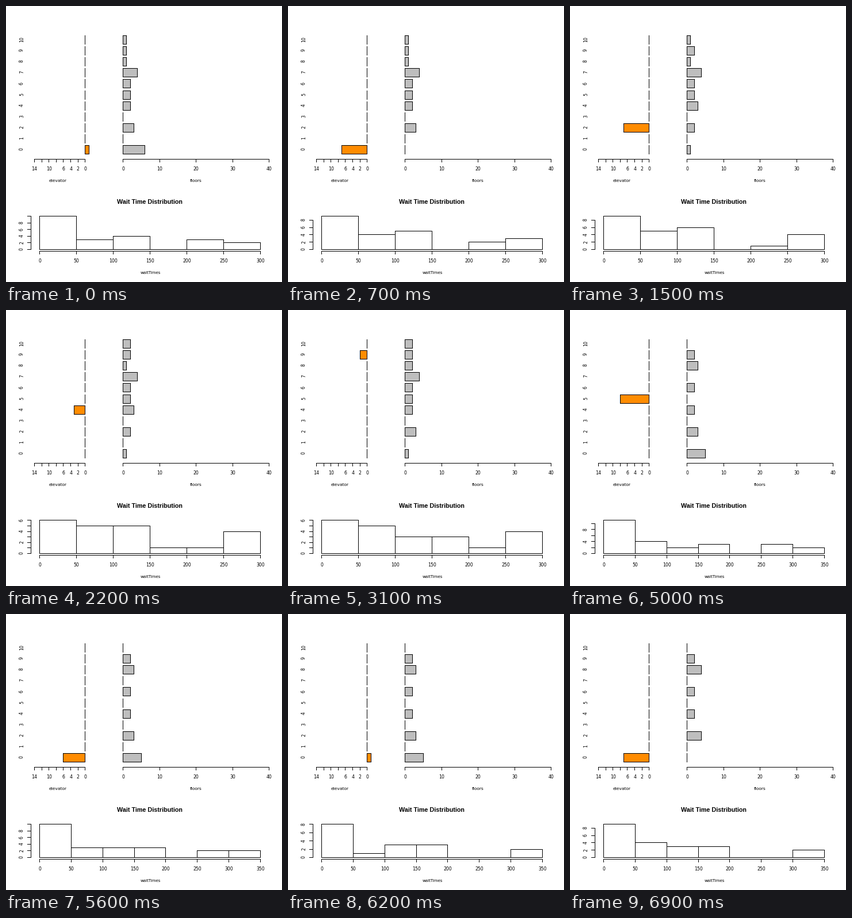
These frames come from a looping animation (480 by 480 pixels, 7100 ms). A matplotlib script:

```python
import numpy as np
import matplotlib.pyplot as plt
from matplotlib.animation import FuncAnimation
from matplotlib.patches import Rectangle

SIZE, DPI = 480, 100
STEPS, STEP_MS = 71, 100
PX = 72 / DPI

CAB_X, CAB_UNIT = 137.4, 6.32
HALL_X, HALL_UNIT = 203, 6.36
FLOOR_Y, FLOOR_GAP, BAR_H = 242, 19.1, 15
HIST_X, HIST_W, HIST_Y, HIST_H = 58, 384, 423, 57.6

# The cab's trip: arrival step, floor, riders out, riders in (one per step)
TRIP = [(0, 0, 0, 8), (10, 2, 2, 1), (15, 2, 3, 0), (21, 4, 1, 1),
        (26, 6, 2, 0), (31, 9, 1, 0), (35, 10, 1, 2), (40, 7, 1, 4),
        (47, 5, 0, 3), (54, 0, 8, 7)]
SPEED = 2  # floors per step

# Opening queues, and the steps at which someone joins a floor's queue
QUEUES = [6, 0, 3, 0, 2, 2, 2, 4, 1, 1, 1]
JOINS = {0: (7, 8, 13, 36, 38, 40, 43, 65, 67), 2: (27, 68), 4: (12,),
         5: (39,), 8: (30, 36, 65), 9: (10,), 10: (18,)}

# Key steps for people who have waited over 50; newcomers fill the first bin
WAITED = {0: (3, 4, 0, 3, 2, 0), 15: (5, 6, 0, 1, 4, 0),
          31: (5, 3, 3, 1, 4, 0), 41: (4, 3, 2, 0, 4, 1),
          50: (4, 2, 3, 0, 3, 2), 62: (1, 3, 3, 0, 0, 2),
          69: (4, 3, 3, 0, 0, 2)}

fig = plt.figure(figsize=(SIZE / DPI, SIZE / DPI), dpi=DPI, facecolor="white")
ax = fig.add_axes([0, 0, 1, 1])
ax.set_xlim(0, SIZE)
ax.set_ylim(SIZE, 0)
ax.axis("off")


def clamp(v, low, high):
    return max(low, min(v, high))


def snap(v):
    # a quarter pixel in, so the renderer settles on this very pixel
    return np.floor(np.asarray(v, float) + 0.5) + 0.25


def line(xs, ys):
    return ax.plot(snap(xs), snap(ys), color="black", lw=PX, antialiased=False,
                   solid_capstyle="projecting")[0]


def box(x0, y0, x1, y1, fill="none"):
    x0, y0, x1, y1 = snap([x0, y0, x1, y1])
    return ax.add_patch(Rectangle((x0, y0), x1 - x0, y1 - y0, facecolor=fill,
                                  edgecolor="black", lw=PX, antialiased=False))


def label(x, y, s, size=7.8, angle=0, **font):
    font.setdefault("family", "DejaVu Sans")
    return ax.text(x + 0.5, y + 0.5, s, fontsize=size * PX, rotation=angle,
                   ha="center", va="center", color="black", **font)


def x_axis(xs, names, y):
    parts = [line([xs[0], xs[-1]], [y, y])]
    for x, name in zip(xs, names):
        parts.append(line([x, x], [y, y + 5]))
        parts.append(label(x, y + 17, name))
    return parts


def y_axis(top):
    unit = HIST_H / top
    step = 1 if top < 7 else 2
    ticks = range(0, top + 1, step)
    tight = unit * step < 11
    parts = [line([43, 43], [HIST_Y, HIST_Y - ticks[-1] * unit])]
    for i, v in enumerate(ticks):
        y = HIST_Y - v * unit
        parts.append(line([37, 43], [y, y]))
        if (tight and i % 2 == 0) or (not tight and v < 10):
            parts.append(label(27, y - 0.5, str(v), angle=90))
    return parts


def bar(x, floor, length, fill):
    y = FLOOR_Y - floor * FLOOR_GAP
    if length == 0:
        return line([x, x], [y, y + BAR_H])
    return box(min(x, x + length), y, max(x, x + length), y + BAR_H, fill)


def state(step):
    """Cab floor, riders, queues and the clock, which rests before departure."""
    riders, queues = 0, list(QUEUES)
    done = [stop for stop in TRIP if stop[0] <= step]
    for arrive, stop, out, take in done:
        left = clamp(step - arrive, 0, out)
        boarded = clamp(step - arrive - out, 0, take)
        riders += boarded - left
        queues[stop] -= boarded

    floor = stop
    if len(done) < len(TRIP):
        due, goal = TRIP[len(done)][:2]
        reach = SPEED * (due - step)
        floor = goal + clamp(stop - goal, -reach, reach)
    clock = min(step, arrive + out + take) if floor == stop else step

    for f, steps in JOINS.items():
        queues[f] += sum(s <= clock for s in steps)
    return floor, riders, queues, clock


def wait_counts(clock, people):
    keys = list(WAITED)
    older = [int(np.interp(clock, keys, b) + 0.5) for b in zip(*WAITED.values())]
    counts = [people - sum(older)] + older
    return counts if counts[-1] else counts[:-1]


def histogram(counts):
    n, top = len(counts), max(counts)
    xs = HIST_X + HIST_W * np.arange(n + 1) / n
    parts = x_axis(xs, [str(50 * i) for i in range(n + 1)], 426)
    parts += y_axis(top)
    for x0, x1, c in zip(xs, xs[1:], counts):
        y = HIST_Y - c * HIST_H / top
        parts.append(box(x0, y, x1, HIST_Y) if c
                     else line([x0, x1], [HIST_Y, HIST_Y]))
    return parts


def backdrop():
    for floor in range(11):
        label(27, 248.2 - floor * FLOOR_GAP, str(floor), angle=90)
    cab_ticks = range(14, -1, -2)
    x_axis([CAB_X - v * CAB_UNIT for v in cab_ticks],
           ["" if v in (8, 12) else str(v) for v in cab_ticks], 266)
    hall_ticks = range(0, 41, 10)
    x_axis([HALL_X + v * HALL_UNIT for v in hall_ticks],
           [str(v) for v in hall_ticks], 266)
    label(90, 303, "elevator", 7.5)
    label(330, 303, "floors", 7.5)
    label(250.5, 463.5, "waitTimes", 7)
    label(249.5, 341, "Wait Time Distribution", 10.7,
          family="Liberation Sans", weight="bold")


live = []


def clear():
    while live:
        live.pop().remove()
    return []


def draw(step):
    clear()
    cab, riders, queues, clock = state(step)
    load = riders or -1  # an empty cab shows as a stub on the far side
    for floor, waiting in enumerate(queues):
        shown = load if floor == cab else 0
        live.append(bar(CAB_X, floor, -shown * CAB_UNIT, "#ff8c00"))
        live.append(bar(HALL_X, floor, waiting * HALL_UNIT, "#bebebe"))
    live.extend(histogram(wait_counts(clock, sum(queues) + riders)))
    return live


backdrop()
anim = FuncAnimation(fig, draw, frames=STEPS, init_func=clear,
                     interval=STEP_MS, repeat=True, repeat_delay=0, blit=False)
plt.show()
```
